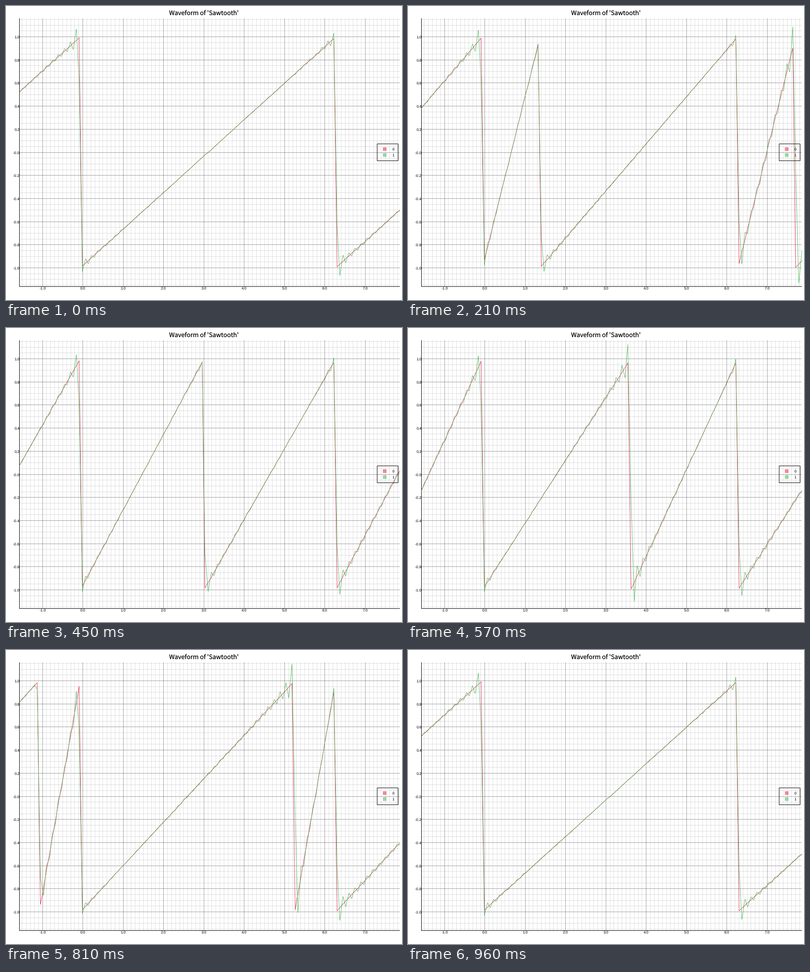
Recreate the animation shown at these times as a matplotlib script. Size 869x645 px, loop 0.99 s.

```python
import numpy as np
import matplotlib.pyplot as plt
from matplotlib.animation import FuncAnimation
from matplotlib.patches import Rectangle

W, H, DPI = 869, 645, 128
PX = 72 / DPI                      # one pixel in points
TAU = 2 * np.pi
TITLE_FONT, LABEL_FONT = "Noto Sans CJK JP", "Liberation Sans"
RED, GREEN = (230 / 255, 25 / 255, 75 / 255), (60 / 255, 180 / 255, 75 / 255)

LEFT, RIGHT, TOP, BOTTOM = 29.5, 864, 27, 615
T_MIN, T_SPAN, Y_MAX = -np.pi / 2, 1.5 * TAU, 1.16

SAMPLES, HARMONICS = 128, 42
STEPS, FRAMES, HOLD = 31, 33, 18   # the split point pauses once at HOLD

plt.rcParams["text.hinting"] = "none"
plt.rcParams["path.simplify"] = False


def to_x(t):
    """Centre of the pixel column at time t."""
    return np.floor(LEFT + (t - T_MIN) / T_SPAN * (RIGHT - LEFT)) + 0.5


def to_y(v):
    """Centre of the pixel row at value v."""
    return np.floor(TOP + (Y_MAX - v) / (2 * Y_MAX) * (BOTTOM - TOP) + 1e-3) + 0.5


index = np.arange(SAMPLES)
times = T_MIN + (index + 1) * T_SPAN / SAMPLES
curve_x = to_x(T_MIN + index * T_SPAN / (SAMPLES - 1))
order = np.arange(1, HARMONICS + 1)
waves = np.exp(1j * np.outer(times, order))


def sawtooth(split):
    """Two ramps from -1 to 1 per turn, meeting at the split point."""
    t = times % TAU
    return np.where(t < split, 2 * t / split, 2 * (t - split) / (TAU - split)) - 1


def fourier(split):
    """Partial Fourier sum of the same wave."""
    turn = np.exp(-1j * order * split)
    slopes = 2 / split - 2 / (TAU - split)
    jumps = -2 * (1 + turn)
    coef = (slopes * (1 - turn) / (1j * order) + jumps) / (TAU * 1j * order)
    return 2 * (waves @ coef).real


fig = plt.figure(figsize=(W / DPI, H / DPI), dpi=DPI, facecolor="white")
ax = fig.add_axes([0, 0, 1, 1])
ax.set_xlim(0, W)
ax.set_ylim(H, 0)
ax.axis("off")


def line(xs, ys, color, z, alpha=1.0, width=1.0):
    return ax.plot(xs, ys, color=color, alpha=alpha, lw=width * PX, zorder=z,
                   snap=False, solid_capstyle="butt",
                   solid_joinstyle="miter")[0]


def label(x, y, text, size=8.3, ha="center", font=LABEL_FONT):
    ax.text(x, y, text, family=font, fontsize=size * PX, color="black",
            ha=ha, va="baseline", zorder=8)


def grid(t_values, v_values, alpha, z):
    for x in to_x(t_values):
        line([x, x], [TOP, BOTTOM], "black", z, alpha)
    for y in to_y(v_values):
        line([LEFT, RIGHT], [y, y], "black", z, alpha)


t_ticks = np.arange(-1, 8)
v_ticks = np.arange(-5, 6) / 5
grid(np.arange(-15, 79) / 10, np.arange(-23, 24) / 20, 0.12, 1)
grid(t_ticks, v_ticks, 0.28, 2)

line([29.5, 29.5], [TOP, BOTTOM + 1], "black", 3)
line([29, RIGHT + 0.5], [615.5, 615.5], "black", 3)

for t in t_ticks:
    label(to_x(t), 621.7, f"{t:.1f}")
for v in v_ticks:
    label(30.3, to_y(v) + 3, f"{v:.1f}" if v else "-0.0", ha="right")
label(434.5, 19.8, "Waveform of 'Sawtooth'", 13.6, font=TITLE_FONT)

exact = line([], [], RED, 4, width=0.8)
approx = line([], [], GREEN, 5, width=0.8)

ax.add_patch(Rectangle((814.5, 302.5), 46, 37, fill=False, ec="black",
                       lw=PX, snap=False, zorder=7))
for row, color in enumerate((RED, GREEN)):
    y = 310 + 13 * row
    ax.add_patch(Rectangle((827, y), 8, 8, fc=color, alpha=0.5, lw=0,
                           snap=False, zorder=7))
    label(850, y + 7.2, str(row))


def update(frame):
    step = frame - (frame >= HOLD)
    split = np.clip(step * TAU / STEPS, 1e-6, TAU - 1e-6)
    exact.set_data(curve_x, to_y(sawtooth(split)))
    approx.set_data(curve_x, to_y(fourier(split)))
    return exact, approx


anim = FuncAnimation(fig, update, frames=FRAMES, interval=30,
                     repeat=True, repeat_delay=0, blit=False)
plt.show()
```
